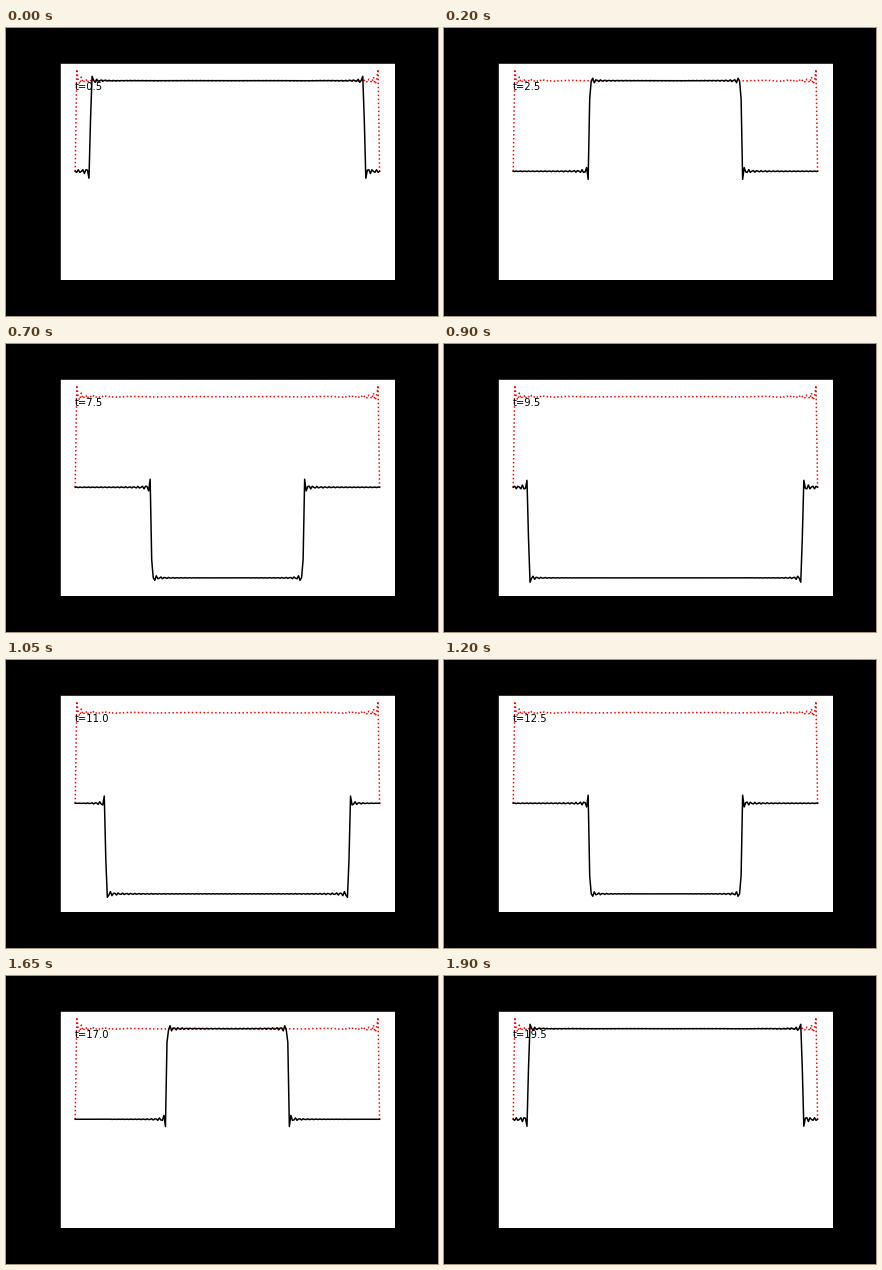
Write a matplotlib script that moves like this. It is 432 px wide and 288 px high and loops after 1950 ms.

```python
import numpy as np
import matplotlib.pyplot as plt
from matplotlib.animation import FuncAnimation

LENGTH = 10
SPEED = 1
STEP = 0.5
FRAMES = 39
INTERVAL = 50

plt.rcParams["font.family"] = "DejaVu Sans"

x = np.linspace(0, LENGTH, 200)
k = np.arange(1, 250, 2) * np.pi / LENGTH
modes = 4 / (k * LENGTH) * np.sin(np.outer(x, k))


def string(t):
    """Displacement of a plucked string: odd sine series of a unit step."""
    return modes @ np.cos(k * SPEED * t)


fig = plt.figure(figsize=(6, 4), dpi=72, facecolor="black")
fig.subplots_adjust(left=0.125, right=0.9, bottom=0.125, top=0.88)
ax = fig.add_subplot()
ax.plot(x, string(0), "r:", lw=1.5)
wave, = ax.plot(x, string(STEP), "k-", lw=1.5)
label = ax.text(0, 0.9, "", fontsize=10, color="black")
ax.set_ylim(-1.2, 1.2)
ax.set_xticks([])
ax.set_yticks([])


def update(frame):
    t = STEP * (frame + 1)
    wave.set_ydata(string(t))
    label.set_text(f"t={t:.1f}")
    return wave, label


anim = FuncAnimation(fig, update, frames=FRAMES, interval=INTERVAL,
                     repeat=True, repeat_delay=0)
plt.show()
```
